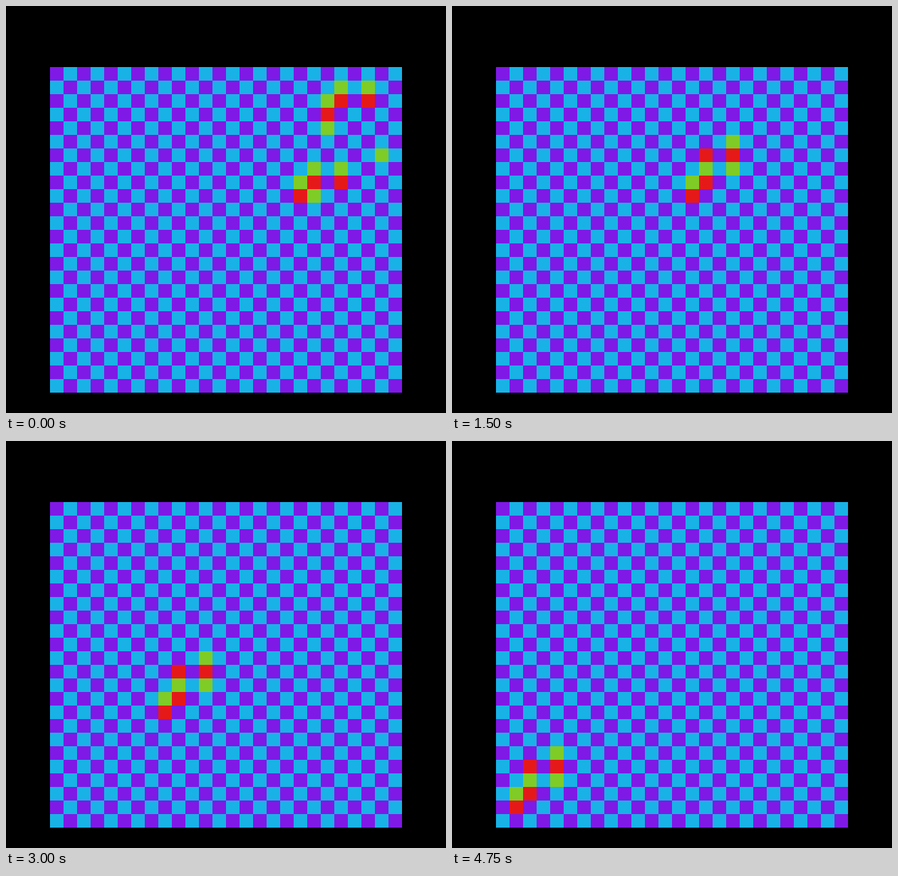
Write an HTML page with a canvas that moves like this. It is 650 px wide and 600 px high and loops after 5000 ms.

```html
<!DOCTYPE html>
<html lang="en">
<head>
<meta charset="utf-8">
<title>Glider on a checkerboard</title>
<style>
  html, body { margin: 0; width: 100%; height: 100%; overflow: hidden; background: #000; }
  canvas { display: block; }
</style>
</head>
<body>
<canvas id="stage" width="650" height="600"></canvas>
<script>
const ctx = document.getElementById('stage').getContext('2d');
const COLS = 26, ROWS = 24, CELL = 20, LEFT = 65, TOP = 90;
const STEP_MS = 250, STEPS = 20;
// Each palette holds the colours of even and odd cells.
const RESTING = ['#7f19e6', '#19b2e6'];
const ACTIVE = ['#7fcc26', '#e61919'];

function drawColumn(col, top, length, palette = ACTIVE) {
  for (let row = top; row < top + length; row++) {
    ctx.fillStyle = palette[(col + row) % 2];
    ctx.fillRect(LEFT + col * CELL, TOP + row * CELL, CELL, CELL);
  }
}

// Moves one cell down-left per step while its neck and tail grow.
function drawGlider(step) {
  const col = 20 - step, row = 2 + step;
  const neck = Math.min(step, 1), lag = Math.min(step, 2);
  drawColumn(col, row, 3 - neck);
  drawColumn(col + 1, row - 1 - neck, 2 + neck);
  drawColumn(col + 3, row - 1 - lag, step < 4 ? 2 : 3);
}

// A second figure that shrinks away; lengths below one draw nothing.
function drawDebris(step) {
  drawColumn(18, 8 + step, 2 - step);
  drawColumn(19, 7, 3 - 3 * step);
  drawColumn(24, 6, 1 - step);
  if (step < 3) drawColumn(21 - step, 7, 2);
}

function draw(step) {
  for (let col = 0; col < COLS; col++) drawColumn(col, 0, ROWS, RESTING);
  drawGlider(step);
  drawDebris(step);
}

let start;
function tick(now) {
  start ??= now;
  draw(Math.floor((now - start) / STEP_MS) % STEPS);
  requestAnimationFrame(tick);
}
draw(0);
requestAnimationFrame(tick);
</script>
</body>
</html>
```
